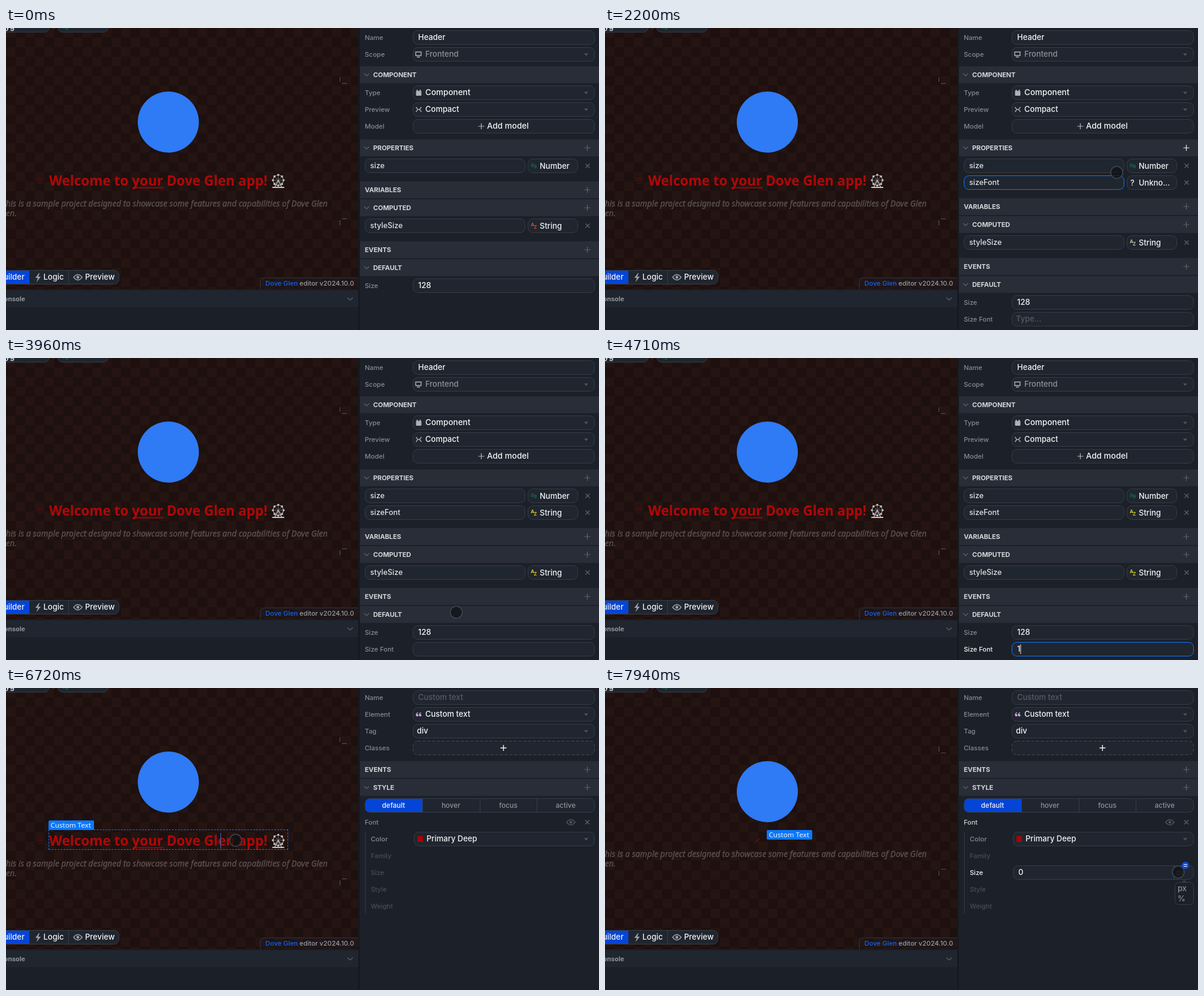
Animation of 990 by 504 pixels, one loop 8 s. Source, as an HTML page:

```html
<!DOCTYPE html>
<html lang="en">
<head>
<meta charset="utf-8">
<title>Component editor</title>
<style>
html, body { margin: 0; width: 100%; height: 100%; overflow: hidden; background: #1c2029; }
svg { display: block; width: 990px; height: 504px; font: 500 13px Inter, "Open Sans", sans-serif; fill: #f2f3f5; white-space: pre; }
.label { font-size: 11px; fill: #858b93; }
.head { font-size: 11px; font-weight: 700; fill: #d2d4d7; letter-spacing: -.1px; }
.prop { font-size: 12.5px; fill: #dfe1e4; }
.grey { fill: #8d9299; }
.faint { fill: #555c66; }
.dim { font-size: 11px; fill: #474d57; }
.field { fill: #20262f; stroke: #363c46; }
.line { fill: none; stroke: #5d636d; stroke-width: 1.2; }
.az { font-size: 8px; font-weight: 700; }
.noto { font-family: "Noto Sans", "Open Sans", sans-serif; }
.intro { font-size: 13.65px; font-style: italic; text-anchor: end; fill: #5c524f; stroke: #5c524f; stroke-width: .3; }
.outline { box-sizing: border-box; height: 34px; border: 1px dashed #0a78ff; }
</style>
</head>
<body>
<svg id="stage" viewBox="0 0 990 504"></svg>
<script>
const LOOP = 8000;
const stage = document.getElementById('stage');

const text = (x, y, s, cls = '', more = '') => `<text x="${x}" y="${y}" class="${cls}" ${more}>${s}</text>`;
const rect = (x, y, w, h, more = '') => `<rect x="${x}" y="${y}" width="${w}" height="${h}" ${more}/>`;
const path = (d, more = 'class="line"') => `<path d="${d}" ${more}/>`;
const group = (id, body, more = '') => `<g id="${id}" ${more}>${body}</g>`;
const field = (x, y, w, more = '') => rect(x + .5, y - 11.5, w - 1, 23, `rx="8" class="field" ${more}`);
const label = (y, s, more) => text(599, y + 4, s, 'label', more);
const plus = (x, y, more) => path(`M${x - 5} ${y}h10M${x} ${y - 5}v10`, more);
const cross = (x, y) => path(`M${x - 3.5} ${y - 3.5}l7 7m0-7l-7 7`);
const chevron = (x, y) => path(`M${x - 4} ${y - 2}l4 4l4-4`);
const arrow = y => path(`M965 ${y - 1.5}h7l-3.5 4z`, 'fill="#4f5660"');

function header(y, s, { open = true, add = true } = {}) {
  return rect(591, y, 399, 28, 'fill="#282d37"') + (open ? chevron(602, y + 14) : '') +
    text(open ? 613 : 599, y + 18, s, 'head') +
    (add ? plus(970.5, y + 14) : '');
}
const az = (x, y) => `<g class="az">${text(x, y, 'A')}${text(x + 5, y + 4, 'Z')}</g>`;
const digits = (x, y) => `<g class="az" fill="#17694a">${text(x, y + 1, '0')}${text(x + 5, y + 3, '9')}</g>`;

function typeButton(y, s, icon, id = '') {
  return field(871, y, 84) + icon + text(891, y + 4.5, s, '', id) + cross(971, y);
}

// Left side
function wheel(cx, cy) {
  let s = `<circle cx="${cx}" cy="${cy}" r="8.5" fill="none" stroke="#a5a5a5" stroke-width="1.2"/>`;
  for (let i = 0; i < 8; i++) {
    const a = i * Math.PI / 4, x = cx + 9 * Math.cos(a), y = cy + 9 * Math.sin(a);
    s += path(`M${cx} ${cy}L${x} ${y}`, 'stroke="#858585" stroke-width=".8"') +
      rect(x - 1.6, y - 1.6, 3.2, 3.2, 'rx="1" fill="#c4c4c4"');
  }
  return s + path(`M${cx} ${cy}l-6 12m6-12l6 12m-10 0h8`, 'stroke="#c4c4c4" stroke-width="1.3" fill="none"') +
    rect(cx - 10, cy + 11, 20, 2, 'fill="#c4c4c4"');
}
let wave = 'M212 268';
for (let i = 0; i < 17; i++) wave += `l1.5 -3l1.5 3`;

const left = `
<defs><pattern id="check" width="32" height="32" patternUnits="userSpaceOnUse">
  ${rect(0, 0, 32, 32, 'fill="#1d100f"')}${rect(0, 0, 16, 16, 'fill="#241412"')}${rect(16, 16, 16, 16, 'fill="#241412"')}
</pattern></defs>
${rect(0, 0, 589, 436, 'fill="url(#check)"')}
${rect(-20, -20, 92, 27, 'rx="8" class="field"')}${text(-1, 2, 'yg')}
${path('M76 -3l4 4')}
${rect(86.5, -20, 84, 27, 'rx="8" class="field"')}${digits(94, 0)}
${group('upper', '<circle cx="271" cy="157" r="51" fill="#2f7af5"/>' +
  path('M557.5 82v8M561 92.5h8', 'stroke="#5a5350" fill="none"'))}
${group('title', text(72, 263, 'Welcome to your Dove Glen app!', 'noto', 'fill="#b00808" font-size="22.6" font-weight="700"') +
  path(wave, 'stroke="#b00808" fill="none"') + wheel(454.5, 254) +
  path('M53 251h8m-8 4h8m-8 4h8', 'stroke="#4c1010" stroke-width="2" stroke-dasharray="2 1"'))}
${group('lower', text(537, 298, 'This is a sample project designed to showcase some features and capabilities of Dove Glen', 'noto intro') +
  text(18, 314, 'Glen.', 'noto intro') +
  path('M557.5 321v8M561 318.5h8', 'stroke="#5a5350" fill="none"'))}
${group('picked', '<foreignObject x="71" y="236" width="400" height="34"><div class="outline"></div></foreignObject>' +
  rect(358, 242, 1, 26, 'fill="#2f6fd0"'))}
${path('M250 259l8-8', 'id="speck" stroke="#5a1010" stroke-width="2"')}
${group('tag', rect(71, 221, 76, 16, 'rx="2" fill="#0a78ff"') + text(74.5, 233, 'Custom Text', 'noto', 'font-size="11.6"'))}
${rect(-10, 404.5, 198.5, 23, 'rx="8" class="field"')}
${rect(0, 405, 39, 22, 'fill="#0445d8"')}${path('M104.5 405v22', 'stroke="#363c46"')}
${text(31, 420, 'Builder', '', 'text-anchor="end"')}
${path('M55 409l-6 8h4l-2 7l7-9h-4l2-6z', 'fill="#9a9fa6"')}${text(62.5, 420, 'Logic')}
${path('M113 416q7-9 14 0q-7 9-14 0z', 'fill="none" stroke="#9a9fa6" stroke-width="1.6"')}
<circle cx="120" cy="416" r="2.4" fill="#9a9fa6"/>${text(132, 420, 'Preview')}
${path('M424.5 437v-12q0-8 8-8h157v20z', 'fill="#1c2029" fill-opacity=".3" stroke="#31363f"')}
${text(581, 430, '<tspan fill="#1263f5">Dove Glen</tspan> editor v2024.10.0', '', 'text-anchor="end" font-size="11" fill="#989da4"')}
${rect(0, 436, 589, 68, 'fill="#1b1f27"')}${rect(0, 438, 589, 28, 'fill="#20262f"')}
${text(32, 456, 'Console', 'head', 'text-anchor="end" style="fill:#8d9299"')}
${path('M570 450l4.5 4l4.5-4')}
${rect(588, 0, 402, 504, 'fill="#1c2029"')}${rect(588, 0, 2.5, 504, 'fill="#15181f"')}`;

// Right side: component settings
const kinds = ['String', 'Number', 'Boolean', 'Object', 'Array', 'Date', 'Time', 'Color', 'Event', 'Any'];
const component = group('component', `
${label(16, 'Name')}${field(679, 16, 304)}${text(688, 20, 'Header')}
${label(44, 'Scope')}${field(679, 44, 304)}${path('M684 40h9v6h-9zM686 48.5h5', 'fill="none" stroke="#aeb2b8" stroke-width="1.4"')}
${text(700, 48, 'Frontend', 'grey')}${arrow(44)}
${header(64, 'COMPONENT', { add: false })}
${label(108, 'Type')}${field(679, 108, 304)}${rect(684.5, 105, 9, 8, 'rx="1" fill="#aeb2b8"')}${path('M686.5 103v2m5-2v2', 'stroke="#aeb2b8" stroke-width="2"')}
${text(700, 112, 'Component', '', 'font-size="13.5"')}${arrow(108)}
${label(136, 'Preview')}${field(679, 136, 304)}${path('M684.5 132l3 4l-3 4m9-8l-3 4l3 4m-6-4h3', 'fill="none" stroke="#aeb2b8" stroke-width="1.3"')}
${text(700, 140, 'Compact')}${arrow(136)}
${label(164, 'Model')}${field(679, 164, 304)}${plus(793.5, 164, 'stroke="#b5b9be" stroke-width="1.2"')}${text(803, 168, 'Add model', '', 'font-size="13.5"')}
${header(186, 'PROPERTIES', { add: false })}
${rect(959, 188, 24, 24, 'id="press" fill="#24718a"')}${plus(970.5, 200, 'class="line" id="addProp"')}
${field(599, 230, 268)}${text(608, 234, 'size', 'prop')}${typeButton(230, 'Number', digits(876, 231))}
${group('below', `
  ${header(256, 'VARIABLES', { open: false })}${header(286, 'COMPUTED')}
  ${field(599, 330, 268)}${text(608, 334, 'styleSize', 'prop')}
  ${typeButton(330, 'String', group('azA', az(876, 331)))}
  ${header(356, 'EVENTS', { open: false })}${header(386, 'DEFAULT', { add: false })}
  ${label(430, 'Size')}${field(679, 430, 304)}${text(688, 434, '128')}`)}
${group('fresh', `
  ${field(599, 258, 268, 'id="propBox"')}
  ${text(608, 262, 'Property name...', 'faint', 'id="propHint"')}${text(608, 262, '', 'prop', 'id="propText"')}
  ${typeButton(258, 'Unkno...', group('ask', text(877, 262.5, '?')) + group('azB', az(876, 259), 'fill="#cfc22a"'), 'id="propType"')}
  ${label(486, '', 'id="sizeLabel"')}${field(679, 486, 304, 'id="sizeBox"')}
  ${text(686, 490, 'Type...', 'faint', 'id="sizeHint"')}${text(688, 490, '', '', 'id="sizeText"')}
  ${rect(608, 250, 1, 16, 'id="caret" fill="#e8e8e8"')}
  ${group('menu', rect(871.5, 272.5, 83, 183, 'rx="6" fill="#1c2129" stroke="#363c46"') +
    kinds.map((k, i) => text(877, 287 + i * 17.8, k, i ? 'grey' : '')).join(''))}`)}`);

// Right side: element settings
const tabs = ['default', 'hover', 'focus', 'active'];
const element = group('element', `
${label(16, 'Name')}${field(679, 16, 304)}${text(688, 20, 'Custom text', 'faint')}
${label(44, 'Element')}${field(679, 44, 304)}
${path('M688 41q-3 1-3 4m8-4q-3 1-3 4', 'fill="none" stroke="#d6a6e4" stroke-width="1.3"')}<g fill="#d6a6e4"><circle cx="686.5" cy="45.5" r="2"/><circle cx="691.5" cy="45.5" r="2"/></g>
${text(700, 48, 'Custom text')}${arrow(44)}
${label(72, 'Tag')}${field(679, 72, 304)}${text(686, 76, 'div')}${arrow(72)}
${label(100, 'Classes')}${field(679, 100, 304, 'stroke-dasharray="5 3" style="stroke:#454b55"')}${plus(830.5, 100, 'stroke="#f2f3f5" stroke-width="1.4"')}
${header(122, 'EVENTS', { open: false })}${header(152, 'STYLE')}
${field(599, 196, 384)}${path('M695 185h-88q-7 0-7 7v8q0 7 7 7h88z', 'fill="#0445d8"')}
${path('M695.5 185v22M791.5 185v22M886.5 185v22', 'stroke="#363c46"')}
${tabs.map((s, i) => text(647 + i * 95.8, 200, s, i ? 'grey' : '', 'text-anchor="middle" font-size="11.5"')).join('')}
${label(224, 'Font', 'id="fontLabel"')}
${path('M936 224q7-9 14 0q-7 9-14 0z', 'fill="none" stroke="#4b515b" stroke-width="1.7"')}<circle cx="943" cy="224" r="2.4" fill="#4b515b"/>${cross(970.5, 224)}
${rect(599, 240, 2, 136, 'fill="#292e38"')}
${text(609, 256, 'Color', 'label')}${field(681, 252, 302)}${rect(687, 247, 9, 10, 'fill="#a50505"')}${text(702, 256, 'Primary Deep')}${arrow(252)}
${['Family', 'Size', 'Style', 'Weight'].map((s, i) => text(609, 284 + i * 28, s, 'dim', `id="l${s}"`)).join('')}
${group('sizeField', field(681, 308, 302) + text(690, 312, '0') + path('M949.5 297v22', 'stroke="#363c46"') + text(954, 312, 'px', 'faint', 'font-size="11.5"'))}
${group('units', `<circle cx="969" cy="296" r="6" fill="#0a4be0"/>` + path('M966 294.5h6m-6 3h6', 'stroke="#fff" stroke-width="1.1"') +
  path('M963 324l4-4l4 4z', 'fill="#363c46"') + rect(951.5, 324.5, 31, 37, 'rx="6" fill="#1c2129" stroke="#363c46"') +
  text(956, 339, 'px', 'grey') + text(956, 356, '%', 'grey'))}`);

stage.innerHTML = left + component + element +
  '<circle id="cursor" r="10" fill="#0d1116" fill-opacity=".7" stroke="#41464e" stroke-width="1.5"/>';

const el = {};
stage.querySelectorAll('[id]').forEach(n => el[n.id] = n);

const show = (n, on) => n.style.display = on ? '' : 'none';
const between = (t, a, b) => t >= a && t < b;
const ramp = (t, a, b) => Math.min(1, Math.max(0, (t - a) / (b - a)));
const mix = (p, q, k) => `rgb(${p.map((v, i) => Math.round(v + (q[i] - v) * k))})`;
const moveY = (n, y) => n.setAttribute('transform', `translate(0 ${y})`);
const typed = (s, times, t) => s.slice(0, times.filter(v => t >= v).length);

const EDGE = [54, 60, 70], BLUE = [10, 120, 255];
const DIM = [71, 77, 87], MUTED = [133, 139, 147], WHITE = [242, 243, 245];
const PROP_KEYS = [890, 1020, 1170, 1370, 1470, 1560, 1660, 1760];
const SIZE_KEYS = [4700, 4790, 4880, 4960];
const ROUTE = [
  [70, 938, 216], [200, 958, 204], [320, 966, 200], [2190, 966, 200],
  [2200, 854, 241], [2330, 898, 254], [2450, 915, 260], [2700, 915, 262], [2950, 906, 279], [3150, 907, 286],
  [3730, 907, 286], [3820, 850, 334], [3960, 752, 424], [4120, 708, 468], [4440, 692, 486],
  [5230, 692, 486], [5400, 634, 418], [5560, 552, 316], [5710, 508, 264], [5850, 490, 238], [5980, 484, 230],
  [6040, 484, 230], [6150, 424, 246], [6280, 383, 254],
  [6720, 383, 254], [6880, 450, 268], [7080, 590, 300], [7240, 640, 308], [7500, 650, 308],
  [7620, 800, 307], [7760, 930, 307], [7860, 957, 307]
];

function place(t) {
  const i = ROUTE.findIndex(p => p[0] > t);
  if (i < 0) return ROUTE[ROUTE.length - 1].slice(1);
  if (!i) return ROUTE[0].slice(1);
  const [t0, x0, y0] = ROUTE[i - 1], [t1, x1, y1] = ROUTE[i], k = ramp(t, t0, t1);
  return [x0 + (x1 - x0) * k, y0 + (y1 - y0) * k];
}

function draw(t) {
  const added = t >= 410, chosen = t >= 3420, onText = t >= 6250, tiny = t >= 7440;

  show(el.component, !onText);
  show(el.element, onText);
  show(el.fresh, added);
  moveY(el.below, added ? 28 : 0);

  // Adding and naming a property
  show(el.press, between(t, 400, 740));
  el.press.style.opacity = 1 - ramp(t, 500, 740);
  el.addProp.style.stroke = mix([93, 99, 109], WHITE, ramp(t, 500, 740) * (1 - ramp(t, 2210, 2400)));
  const name = typed('sizeFont', PROP_KEYS, t);
  el.propText.textContent = name;
  show(el.propHint, !name);
  el.propBox.style.stroke = mix(EDGE, BLUE, ramp(t, 400, 740) * (1 - ramp(t, 2450, 2600)));
  el.azA.style.fill = chosen ? '#cfc22a' : added ? '#b9b79a' : '#d4481c';
  show(el.ask, !chosen);
  show(el.azB, chosen);
  el.propType.textContent = chosen ? 'String' : 'Unkno...';
  show(el.menu, between(t, 2540, 3420));

  // Default value
  el.sizeLabel.textContent = name ? (name[0].toUpperCase() + name.slice(1)).replace('F', ' F') : '39c54e29 6...';
  const focus = ramp(t, 4540, 4700);
  el.sizeLabel.style.fill = mix(MUTED, WHITE, focus);
  el.sizeBox.style.stroke = mix(EDGE, BLUE, focus);
  el.sizeText.textContent = typed('12px', SIZE_KEYS, t);
  show(el.sizeHint, !chosen);

  const early = t < 3000, host = early ? el.propText : el.sizeText;
  const caretOn = between(t, 410, 1850) || between(t, 4570, 5640);
  show(el.caret, caretOn);
  if (caretOn) {
    el.caret.setAttribute('x', (early ? 608 : 688) + (host.textContent ? host.getComputedTextLength() : 0));
    el.caret.setAttribute('y', early ? 250 : 478);
  }

  // Selecting and shrinking the title
  show(el.picked, onText && !tiny);
  show(el.tag, onText);
  el.tag.setAttribute('transform', tiny ? 'translate(199 16)' : '');
  show(el.title, !tiny);
  show(el.speck, tiny);
  moveY(el.upper, tiny ? 16 : 0);
  moveY(el.lower, tiny ? -16 : 0);
  show(el.sizeField, t >= 7340);
  el.lSize.style.fill = mix(DIM, WHITE, ramp(t, 7400, 7640));
  el.fontLabel.style.fill = mix(MUTED, [205, 208, 212], ramp(t, 7340, 7460));
  show(el.units, t >= 7780);

  const [x, y] = place(t);
  show(el.cursor, between(t, 70, 740) || between(t, 2200, 4640) || t >= 5240);
  el.cursor.setAttribute('transform', `translate(${x} ${y})`);
}

function tick() {
  draw(performance.now() % LOOP);
  requestAnimationFrame(tick);
}
tick();
</script>
</body>
</html>
```
